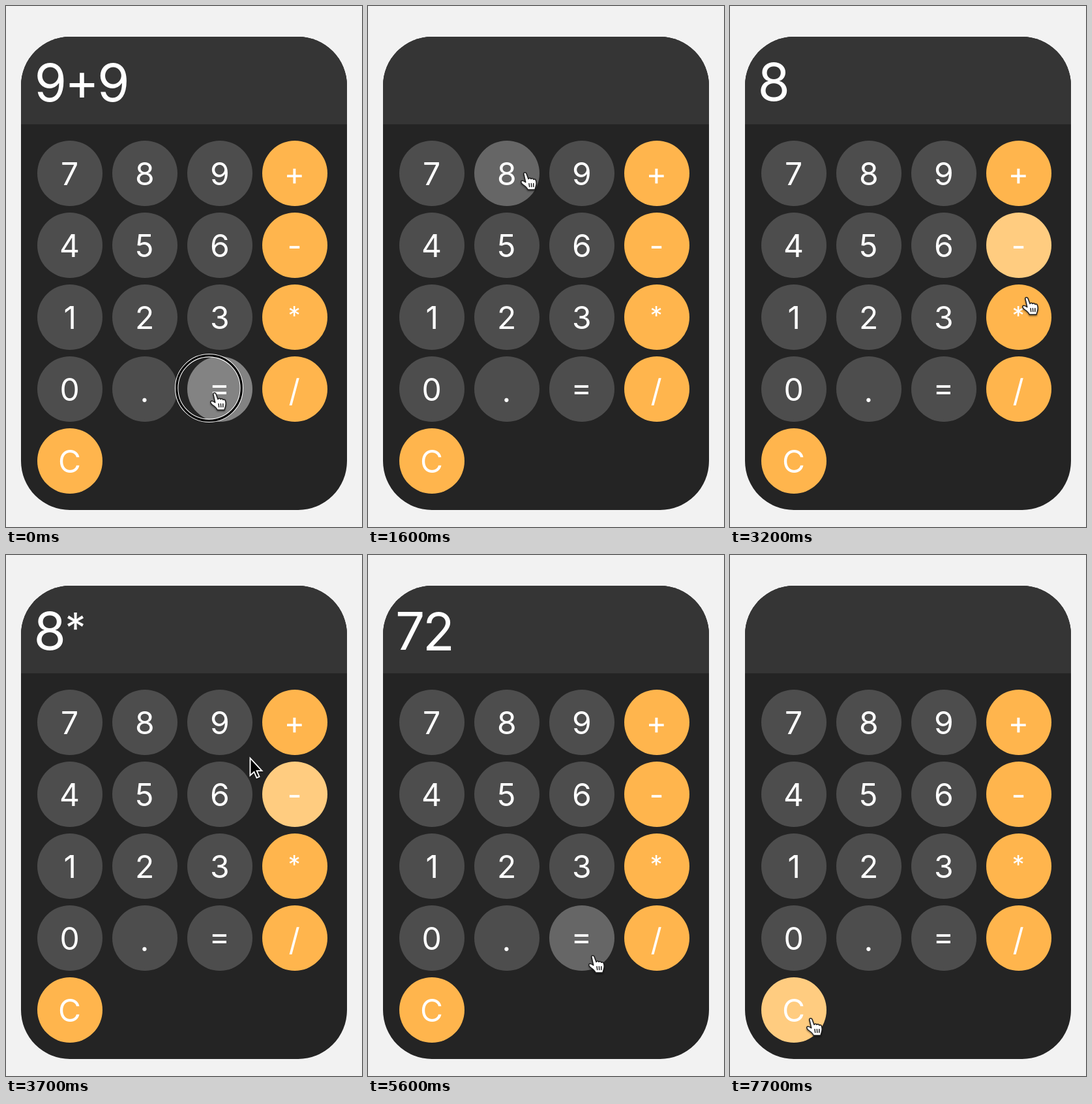
Write an HTML page that moves like this. It is 546x797 px and loops after 8000 ms.

```html
<!DOCTYPE html>
<html lang="en">
<head>
<meta charset="utf-8">
<title>Calculator</title>
<style>
  html, body { margin: 0; width: 100%; height: 100%; overflow: hidden; background: #f2f2f2; }
  svg { display: block; }
  text { font-family: Inter, "Liberation Sans", sans-serif; fill: #fff; }
</style>
</head>
<body>
<svg id="stage" width="546" height="797" viewBox="0 0 546 797">
  <defs>
    <clipPath id="card"><rect x="23" y="47" width="500" height="724" rx="75"/></clipPath>
    <filter id="shadow" x="-40%" y="-40%" width="200%" height="200%">
      <feDropShadow dx="0" dy="1.5" stdDeviation="1.3" flood-opacity=".5"/>
    </filter>
  </defs>
  <g clip-path="url(#card)">
    <rect x="23" y="47" width="500" height="724" fill="#242424"/>
    <rect x="23" y="47" width="500" height="134" fill="#353535"/>
  </g>
  <g id="keys"></g>
  <g id="display"></g>
  <g id="ring" fill="none">
    <circle r="49.8" stroke="#fff" stroke-width="5.4"/>
    <circle r="49.8" stroke="#000" stroke-width="3.3"/>
  </g>
  <g id="cursor" filter="url(#shadow)">
    <g id="hand" stroke="#1c1c1c" stroke-width="1.5" stroke-linejoin="round" stroke-linecap="round">
      <path fill="#fff" d="M-2.3 1.2C-1.6-.8 1-.8 2 1.4L5 9.5C6 7.8 8.4 7.8 9 9.6C10 8.2 12.4 8.6 12.8 10.4C14 9.4 16 10 16.4 11.8C17.4 14.5 17.4 17 16.8 19.5C16.4 21.5 15.5 23.5 15 26H4.2C3.4 24 0 20.4-3.5 18C-6 16-7 13.6-5.4 12.4C-3.8 11.5-1.6 12.8.8 14.6Z"/>
      <path fill="none" d="M6 16.5L6.7 21.5M9.4 16.5L9.8 21.5M12.8 16.5V21.5"/>
    </g>
    <path id="arrow" fill="#000" stroke="#fff" stroke-width="1.8" d="M1 1V27.5L7 22L11 31L15 29.3L11 20.5H19Z"/>
  </g>
</svg>
<script>
const LOOP = 8000, STEP = 100, LAG = 100;
const $ = id => document.getElementById(id);
const pen = document.createElement('canvas').getContext('2d');

function add(parent, tag, attrs) {
  const el = document.createElementNS('http://www.w3.org/2000/svg', tag);
  for (const name in attrs) el.setAttribute(name, attrs[name]);
  return parent.appendChild(el);
}

// Centres the ink of one character on (cx, cy).
function glyph(parent, ch, cx, cy, size) {
  if (ch === '*') size *= .8;
  pen.font = `${size}px Inter, "Liberation Sans", sans-serif`;
  const m = pen.measureText(ch);
  add(parent, 'text', {
    x: cx - (m.actualBoundingBoxRight - m.actualBoundingBoxLeft) / 2,
    y: cy + (m.actualBoundingBoxAscent - m.actualBoundingBoxDescent) / 2,
    'font-size': size
  }).textContent = ch;
}

const GREY = ['#4d4d4d', '#666666', '#838383'];
const ORANGE = ['#ffb54d', '#ffcc80', '#ffe0b3'];
const DROP = { '+': 3.5, '-': 3, '*': -9, '.': 16, '=': 1, '/': 4 };

const keys = [...'789+456-123*0.=/C'].map((ch, i) => {
  const x = 98 + i % 4 * 115, y = 256 + (i >> 2) * 110;
  const tones = '+-*/C'.includes(ch) ? ORANGE : GREY;
  const disc = add($('keys'), 'circle', { cx: x, cy: y, r: 50 });
  glyph($('keys'), ch, x - .6, y + (DROP[ch] || .3), 48);
  return { ch, x, y, tones, disc };
});

// Pointer stops: time, x, y
const path = [
  [0, 320, 592], [300, 320, 592], [1000, 123, 675], [1200, 123, 675],
  [1550, 241, 255], [2200, 241, 255], [2700, 452, 375], [3000, 452, 375],
  [3200, 455, 446], [3500, 455, 446], [3800, 345, 262], [4100, 345, 262],
  [4320, 193, 652], [4400, 193, 652], [4500, 190, 670], [4700, 215, 660],
  [5000, 345, 613], [5800, 345, 613], [6100, 343, 620], [6350, 343, 620],
  [7200, 124, 709], [LOOP, 124, 709]
];

// Presses: time, key, new display, character centres
const presses = [
  [0, '=', '18', [58.5, 102]],
  [1100, 'C', '', []],
  [1900, '8', '8', [67]],
  [3300, '*', '8*', [67, 106.5]],
  [3900, '9', '8*9', [67, 106.5, 148]],
  [5000, '=', '72', [64.5, 109]],
  [7400, 'C', '', []]
];
const HOLD = 200;

function pointer(t) {
  t = Math.max(0, t);
  const i = path.findIndex(p => p[0] > t);
  const [t0, x0, y0] = path[i - 1], [t1, x1, y1] = path[i];
  const u = (t - t0) / (t1 - t0), e = u * u * (3 - 2 * u);
  return [x0 + (x1 - x0) * e, y0 + (y1 - y0) * e];
}

const keyAt = ([x, y]) => keys.find(k => Math.hypot(x - k.x, y - k.y) < 50);

let shown = null;
function show(text, centres) {
  if (text === shown) return;
  shown = text;
  $('display').replaceChildren();
  [...text].forEach((ch, i) => {
    const y = ch === '+' ? 120.5 : ch === '*' ? 101.5 : 116;
    glyph($('display'), ch, centres[i], y, 80);
  });
}

function draw(t) {
  const pos = pointer(t), over = keyAt(pos), hover = keyAt(pointer(t - LAG));
  const down = presses.find(p => t >= p[0] && t < p[0] + HOLD);
  const last = presses.filter(p => t >= p[0] + HOLD).pop();

  for (const k of keys) {
    const state = down && down[1] === k.ch ? 2 : k === hover ? 1 : 0;
    k.disc.setAttribute('fill', k.tones[state]);
  }
  if (last) show(last[2], last[3]);
  else show('9+9', [68, 116.5, 164.5]);

  $('cursor').setAttribute('transform', `translate(${pos})`);
  $('hand').style.display = over ? '' : 'none';
  $('arrow').style.display = over ? 'none' : '';
  $('ring').setAttribute('transform', `translate(${pos[0] - 8.5} ${pos[1] - 7.5})`);
  $('ring').style.display = down && t < down[0] + STEP ? '' : 'none';
}

const start = performance.now();
function tick() {
  const t = Math.max(0, performance.now() - start) % LOOP;
  draw(Math.floor(t / STEP) * STEP);
  requestAnimationFrame(tick);
}
tick();
</script>
</body>
</html>
```
